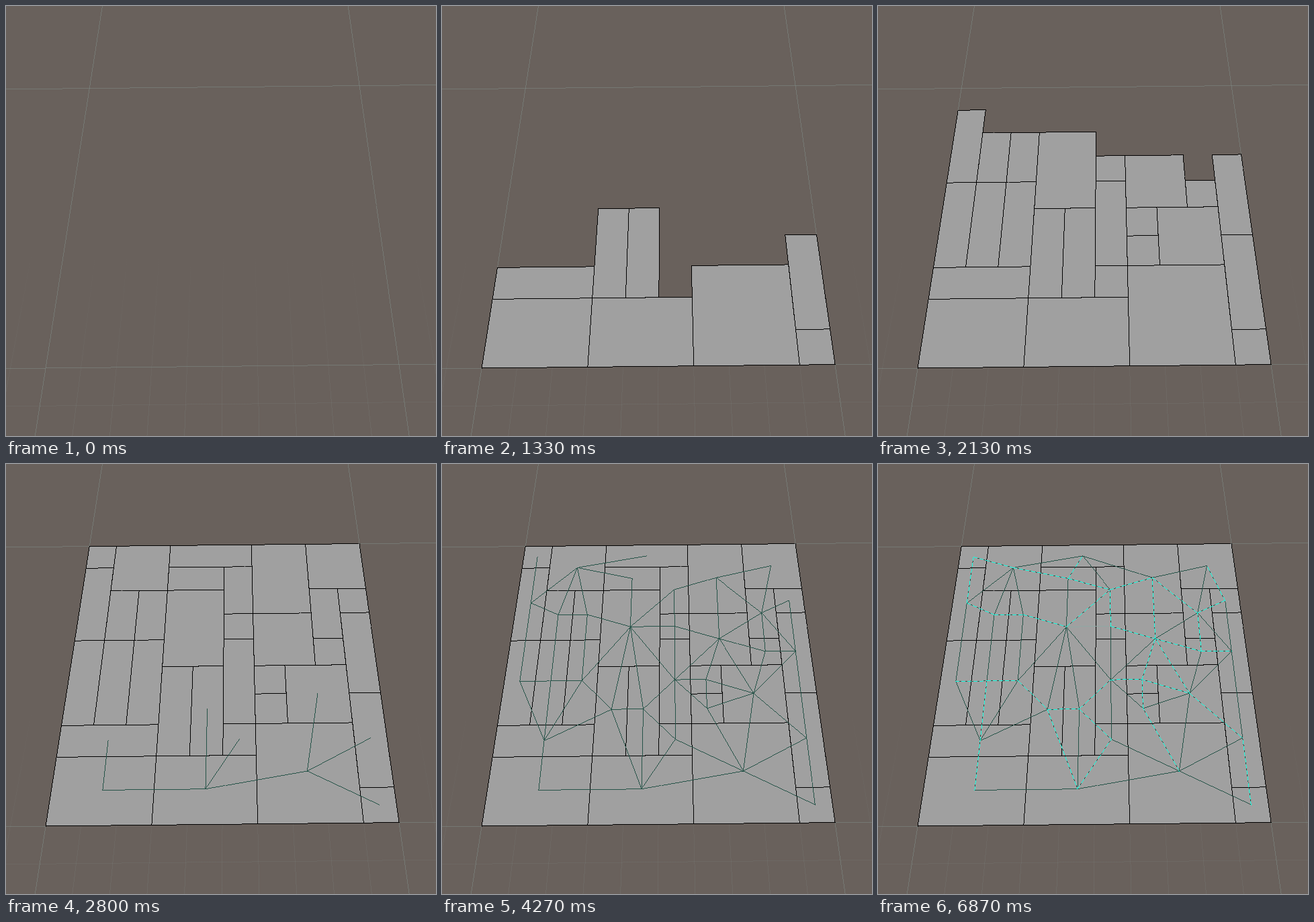
Recreate the animation shown at these times as an HTML page with a canvas. Size 640 px wide and 640 px high, loop 9.34 s.

```html
<!DOCTYPE html>
<html lang="en">
<head>
<meta charset="utf-8">
<title>Room layout</title>
<style>
html, body { margin: 0; width: 100%; height: 100%; overflow: hidden; background: #69615c; }
canvas { display: block; width: 100vw; height: 100vh; }
</style>
</head>
<body>
<canvas id="stage" width="640" height="640"></canvas>
<script>
const ctx = document.getElementById('stage').getContext('2d');
const LOOP = 9340, TICK = 1000 / 15, SIZE = 10, STEP = 55;

// Perspective mapping from floor units (0..10) to the stage.
const project = (() => {
  const [x0, y0] = [59, 539], [x1, y1] = [585, 533.6];
  const [x2, y2] = [526, 118.6], [x3, y3] = [124.2, 122.6];
  const dx1 = x1 - x2, dx2 = x3 - x2, sx = x0 - x1 + x2 - x3;
  const dy1 = y1 - y2, dy2 = y3 - y2, sy = y0 - y1 + y2 - y3;
  const den = dx1 * dy2 - dx2 * dy1;
  const g = (sx * dy2 - sy * dx2) / den, h = (dx1 * sy - dy1 * sx) / den;
  return (x, y) => {
    const u = x / SIZE, v = y / SIZE, w = 1 + g * u + h * v;
    return [
      (x0 + (x1 - x0 + g * x1) * u + (x3 - x0 + h * x3) * v) / w,
      (y0 + (y1 - y0 + g * y1) * u + (y3 - y0 + h * y3) * v) / w
    ];
  };
})();

// Each room goes to the first free cell, row by row.
const rooms = (() => {
  const used = new Set();
  const sizes = ('3x2 3x2 3x3 1x1 1x3 3x1 1x3 1x3 1x1 1x3 1x3 1x3 1x3 1x1 2x2 1x1 1x3 ' +
    '2x3 2x2 1x1 1x3 1x2 1x2 1x1 1x2 1x2 2x3 1x1 2x2 2x1 2x2 1x1 3x1').split(' ');
  return sizes.map(size => {
    const [w, h] = size.split('x').map(Number);
    let cell = 0;
    while (used.has(cell)) cell++;
    const x = cell % SIZE, y = Math.floor(cell / SIZE);
    for (let j = 0; j < h; j++)
      for (let i = 0; i < w; i++) used.add(cell + j * SIZE + i);
    return {
      x, y, w, h, cx: x + w / 2, cy: y + h / 2,
      corners: [[x, y], [x + w, y], [x + w, y + h], [x, y + h]].map(p => project(...p))
    };
  });
})();
const centers = rooms.map(r => project(r.cx, r.cy));

// Neighbour links; the owner is the room whose turn reveals the link.
const links = [];
rooms.forEach((p, a) => rooms.forEach((q, b) => {
  const overlapX = Math.min(p.x + p.w, q.x + q.w) - Math.max(p.x, q.x);
  const overlapY = Math.min(p.y + p.h, q.y + q.h) - Math.max(p.y, q.y);
  const length = Math.hypot(p.cx - q.cx, p.cy - q.cy);
  if (p.x + p.w === q.x && overlapY > 0) links.push({ a, b, owner: a, length });
  if (p.y + p.h === q.y && overlapX > 0) {
    const fromBelow = q.x > p.x || (q.x === p.x && q.w >= p.w);
    links.push({ a, b, owner: fromBelow ? a : b, length });
  }
}));
links.sort((m, n) => Math.min(m.a, m.b) - Math.min(n.a, n.b) ||
  Math.max(m.a, m.b) - Math.max(n.a, n.b));
links.forEach(l => { l.time = 2678 + STEP * l.owner; });

// Minimum spanning tree grown from the last room, oldest link first on ties.
const paths = [];
(() => {
  const start = rooms.length - 1, reached = new Set([start]), frontier = [];
  const extend = n => links.forEach(l => {
    if ((l.a === n || l.b === n) && !frontier.includes(l)) frontier.push(l);
  });
  extend(start);
  while (reached.size < rooms.length) {
    const open = frontier.filter(l => !reached.has(l.a) || !reached.has(l.b));
    const best = open.reduce((m, l) => l.length < m.length - 1e-6 ? l : m);
    const next = reached.has(best.a) ? best.b : best.a;
    paths.push({ a: best.a, b: best.b, time: 4498 + STEP * paths.length });
    reached.add(next);
    extend(next);
  }
})();
// Extra loops
[[28, 29, 6100], [6, 1, 6390], [14, 18, 6660], [17, 25, 6725], [18, 26, 6725], [24, 26, 6860]]
  .forEach(([a, b, time]) => paths.push({ a, b, time }));

// Hard one-pixel line, optionally dashed along its major axis.
function line([xa, ya], [xb, yb], color, on = 1, period = 1) {
  const steps = Math.max(1, Math.round(Math.max(Math.abs(xb - xa), Math.abs(yb - ya))));
  ctx.fillStyle = color;
  for (let i = 0; i <= steps; i++) {
    if (i % period >= on) continue;
    const k = i / steps;
    ctx.fillRect(Math.floor(xa + (xb - xa) * k), Math.floor(ya + (yb - ya) * k), 1, 1);
  }
}

function drawFloor() {
  ctx.fillStyle = '#69615c';
  ctx.fillRect(0, 0, 640, 640);
  const fade = ctx.createLinearGradient(0, 370, 0, 640);
  fade.addColorStop(0, 'rgba(130,140,136,0)');
  fade.addColorStop(1, 'rgba(130,140,136,.2)');
  for (let x = -2; x <= 12; x++)
    if (x % SIZE) line(project(x, -3), project(x, 4), fade);
  line(project(-3, -1), project(13, -1), fade);
  const major = 'rgba(128,140,136,.55)';
  for (const k of [0, SIZE]) {
    line(project(k, -3), project(k, 15), major);
    line(project(-4, k), project(14, k), major);
  }
}

const pace = [[13, 1], [15, 3], [26, 16], [27, 18], [32, 24], [39.4, 33]];
function roomCount(tick) {
  if (tick < pace[0][0]) return 0;
  for (let i = 1; i < pace.length; i++) {
    const [t0, n0] = pace[i - 1], [t1, n1] = pace[i];
    if (tick < t1) return Math.floor(n0 + (n1 - n0) * (tick - t0) / (t1 - t0) + 0.01);
  }
  return rooms.length;
}

function draw(tick) {
  const now = tick * TICK;
  const placed = rooms.slice(0, roomCount(tick));
  drawFloor();
  ctx.fillStyle = '#a0a0a0';
  for (const { corners } of placed) {
    ctx.beginPath();
    corners.forEach(p => ctx.lineTo(...p));
    ctx.fill();
  }
  for (const { corners } of placed)
    corners.forEach((p, i) => line(p, corners[(i + 1) % 4], '#000'));
  for (const l of links)
    if (now >= l.time) line(centers[l.a], centers[l.b], '#265348');
  for (const p of paths) {
    if (now < p.time) continue;
    const faint = Math.min(p.a, p.b) === 17 && Math.max(p.a, p.b) === 23;
    if (faint) line(centers[p.a], centers[p.b], '#90a8a4');
    else line(centers[p.a], centers[p.b], '#14ffe0', 6, 9);
  }
}

let shown = -1;
const begin = performance.now();
function frame() {
  const t = (performance.now() - begin) % LOOP;
  const tick = Math.floor((t + 3.4) / TICK);
  if (tick !== shown) draw(shown = tick);
  requestAnimationFrame(frame);
}
frame();
</script>
</body>
</html>
```
